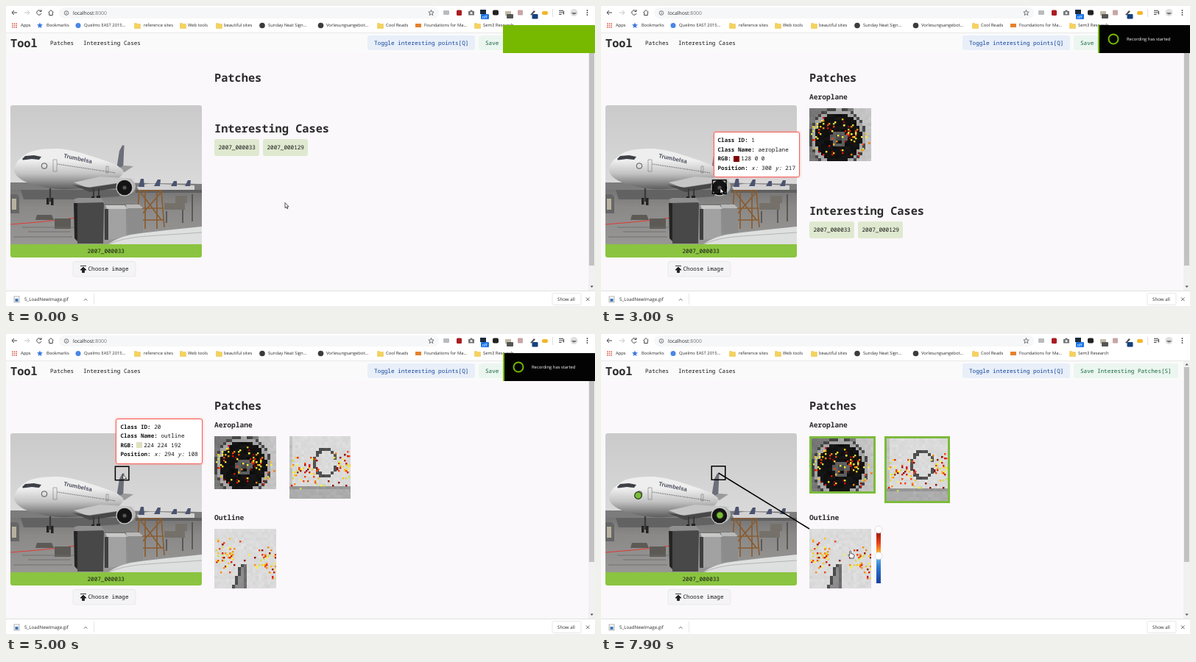
These frames come from a looping animation (800x408 px, 8 s). An HTML page with a canvas:

```html
<!DOCTYPE html>
<html lang="en">
<head>
<meta charset="utf-8">
<title>Patch tool</title>
<style>
html, body { margin: 0; width: 100%; height: 100%; overflow: hidden; background: #fff; }
#stage { position: relative; width: 800px; height: 408px; overflow: hidden; text-rendering: geometricPrecision; }
#stage > * { position: absolute; }
svg { left: 0; top: 0; }
.ui { font: 5.85px "Open Sans", sans-serif; fill: #2a2a2a; }
.mono, #tip { font: 7.65px "Noto Sans Mono", "DejaVu Sans Mono", monospace; fill: #161616; }
.h1 { font-size: 15.3px; font-weight: 600; fill: #2b2b2b; }
.h2 { font-size: 9.6px; font-weight: 600; fill: #2b2b2b; }
canvas { border: 0 solid #7cbb3c; }
canvas.sel { border-width: 3px; }
#tip {
  box-sizing: border-box; padding: 5px; border: 1px solid #f4625c; border-radius: 3px;
  background: #fff; box-shadow: 0 0 3px #f99; color: #161616; line-height: 12.5px; white-space: pre;
}
#tip b { font-weight: 600; }
#tip s { display: inline-block; width: 8px; height: 8px; margin: 0 2.5px 0 3px; vertical-align: -1.5px; }
#note { left: 675px; top: 26px; width: 125px; height: 38px; overflow: hidden; background: #76b900; animation: leave 8s linear infinite; }
#note div { position: absolute; left: 2px; width: 123px; height: 38px; background: #030303; animation: cover 8s linear infinite; }
@keyframes leave { 0%, 74% { transform: none; } 77.5%, 100% { transform: translateX(126px); } }
@keyframes cover {
  0%, 1.4% { transform: translateX(100%); animation-timing-function: ease-out; }
  6%, 71.2% { transform: none; animation-timing-function: ease-in; }
  74%, 100% { transform: translateX(100%); }
}
</style>
</head>
<body>
<div id="stage">
<svg width="800" height="408">
  <defs>
    <linearGradient id="sky" x2="0" y2="1"><stop stop-color="#cbcaca"/><stop offset="1" stop-color="#dadada"/></linearGradient>
    <linearGradient id="ground" x2="0" y2="1"><stop stop-color="#737272"/><stop offset=".35" stop-color="#8a8988"/><stop offset="1" stop-color="#989796"/></linearGradient>
    <linearGradient id="hull" x2="0" y2="1"><stop offset=".3" stop-color="#eeeeee"/><stop offset=".62" stop-color="#c2c2c2"/><stop offset=".85" stop-color="#858585"/><stop offset="1" stop-color="#5c5c5c"/></linearGradient>
    <linearGradient id="hot" x2="0" y2="1"><stop stop-color="#8a0a05"/><stop offset=".5" stop-color="#e8401a"/><stop offset="1" stop-color="#ffd83a"/></linearGradient>
    <linearGradient id="cold" x2="0" y2="1"><stop stop-color="#6fc4ea"/><stop offset=".4" stop-color="#2f78d0"/><stop offset="1" stop-color="#173f9c"/></linearGradient>
    <clipPath id="frame"><path d="M6 324V138q0-3 3-3H263q3 0 3 3V324Z"/></clipPath>
    <clipPath id="page"><path d="M0 64H791V387H0Z"/></clipPath>
    <path id="folder" d="M-4-3h3l1 1h4v6h-8Z" fill="#f6d25c" stroke="#e0b43c" stroke-width=".4"/>
  </defs>

  <rect width="800" height="408" fill="#fff"/>
  <!-- address bar -->
  <rect x="72" y="2" width="516" height="15" rx="7.5" fill="#f6f7f8"/>
  <g fill="none" stroke="#444" stroke-width="1">
    <path d="M15 9H8M11 6L8 9l3 3"/>
    <path d="M25 9h7M29 6l3 3-3 3" stroke="#c4c4c4"/>
    <path d="M47.500 7A3.200 3.200 0 1 0 48 10M48 5v2.500h-2.500"/>
    <path d="M57.500 9l3.500-3.500 3.500 3.500M58.700 8.500v4h4.600v-4"/>
    <circle cx="82" cy="9.500" r="2.800" stroke-width=".7"/><path d="M82 9v2M82 7.600v.7" stroke-width=".7"/>
    <path d="M577.500 5.500l1 2.500 2.600.2-2 1.700.7 2.600-2.300-1.400-2.300 1.400.7-2.600-2-1.700 2.600-.2Z" stroke-width=".7"/>
    <path d="M742.500 4v11" stroke="#ccc" stroke-width=".6"/>
    <path d="M751 6.500h6M751 9h6M751 11.500h3.500M757.500 7v4.500" stroke-width="1.100"/>
  </g>
  <text class="ui" x="91" y="11.800" style="font-size:6.800px">localhost<tspan fill="#777">:8000</tspan></text>
  <rect x="594" y="6" width="8" height="6" rx="1" fill="#b9bcbf"/>
  <rect x="612" y="5.500" width="7" height="7.500" rx="1.500" fill="#a91c20"/>
  <path d="M628 7h2l1-1.500h2l1 1.500h2v5.500h-8Z" fill="#777"/><circle cx="632" cy="9.600" r="1.500" fill="#eee"/>
  <rect x="644" y="5" width="8" height="6" fill="#1c2b3c"/><rect x="645" y="11" width="11" height="7" rx="1" fill="#1a73e8"/>
  <text class="ui" x="646.500" y="16.500" style="fill:#fff;font-size:5.500px">off</text>
  <rect x="661" y="5.500" width="8" height="7" rx="2" fill="#222"/>
  <rect x="678" y="7" width="8" height="6" fill="#c1bba5"/><rect x="680" y="11" width="9" height="6" rx="1" fill="#555"/>
  <rect x="695" y="5.500" width="7" height="7" rx="1" fill="#c9a5a5"/>
  <path d="M712 12l5-6 2 1.500-5 5Z" fill="#555"/><rect x="714.500" y="11" width="8" height="6.500" rx="1" fill="#17407e"/>
  <rect x="728" y="7" width="8" height="5" rx="2" fill="#f3b62c"/>
  <circle cx="771.500" cy="9" r="5" fill="#dedfe1"/><path d="M768 9q3.500 5 7 0Z" fill="#777"/>
  <g fill="#444"><circle cx="789.500" cy="6" r=".9"/><circle cx="789.500" cy="9" r=".9"/><circle cx="789.500" cy="12" r=".9"/></g>

  <!-- bookmarks -->
  <path d="M8 24h7M8 26.500h7M8 29h7" stroke="#d9604f" stroke-width="1.600" stroke-dasharray="1.600 1.100"/>
  <path d="M46 22.500l1.100 2.600 2.900.2-2.200 1.800.7 2.800-2.500-1.500-2.500 1.500.7-2.800-2.200-1.800 2.900-.2Z" fill="#3b78e0"/>
  <circle cx="98" cy="26.500" r="3.500" fill="#4a86e8"/>
  <circle cx="348" cy="26.500" r="3.800" fill="#3c3c3c"/>
  <circle cx="427.500" cy="26.500" r="3.800" fill="#3c3c3c"/>
  <rect x="556" y="24" width="8" height="5" fill="#e5812e"/>
  <use href="#folder" x="178.500" y="26.500"/><use href="#folder" x="240.500" y="26.500"/><use href="#folder" x="289.500" y="26.500"/>
  <use href="#folder" x="508.500" y="26.500"/><use href="#folder" x="640.500" y="26.500"/>
  <g class="ui">
    <text x="20" y="28.400">Apps</text><text x="55" y="28.400">Bookmarks</text>
    <text x="106" y="28.400">Quelmo EAST 2015...</text><text x="187" y="28.400">reference sites</text>
    <text x="247" y="28.400">Web tools</text><text x="296" y="28.400">beautiful sites</text>
    <text x="356" y="28.400">Sunday Neat Sign...</text><text x="435" y="28.400">Vorlesungsangebot...</text>
    <text x="516" y="28.400">Cool Reads</text><text x="568" y="28.400">Foundations for Ma...</text>
    <text x="648" y="28.400">Sem3 Research</text>
  </g>

  <!-- page -->
  <rect y="36" width="800" height="351" fill="#faf8fa"/>
  <rect y="36" width="792" height="28" fill="#fbfafb"/>
  <path d="M0 36.500H800" stroke="#e4e4e4" stroke-width=".8"/>
  <rect x="491" y="40" width="146" height="20" rx="3" fill="#e8eff9"/>
  <rect x="642" y="40" width="142" height="20" rx="3" fill="#ecf6f0"/>
  <g class="mono">
    <text x="6" y="55.500" class="h1">Tool</text>
    <text x="60" y="52.500">Patches</text><text x="105" y="52.500">Interesting Cases</text>
    <text x="500" y="52.500" style="fill:#124297">Toggle interesting points[Q]</text>
    <text x="651" y="52.500" style="fill:#12683a">Save Interesting Patches[S]</text>
    <text x="283" y="103.300" class="h1">Patches</text>
    <text id="aero" x="283" y="126.800" class="h2">Aeroplane</text>
    <text id="outl" x="283" y="252.500" class="h2">Outline</text>
    <g clip-path="url(#page)"><g id="cases">
      <text x="283" y="172" class="h1">Interesting Cases</text>
      <rect x="283" y="181" width="61" height="23" rx="3" fill="#dfe9d0"/><text x="288.500" y="195">2007_000033</text>
      <rect x="349" y="181" width="61" height="23" rx="3" fill="#dfe9d0"/><text x="354.500" y="195">2007_000129</text>
    </g></g>
    <path d="M6 324H266V339q0 3-3 3H9q-3 0-3-3Z" fill="#8ac440"/>
    <text x="110.500" y="336">2007_000033</text>
    <rect x="91" y="347.500" width="85" height="20.500" rx="3" fill="#f4f4f6" stroke="#e3e4e7" stroke-width=".7"/>
    <text x="111.500" y="360.300">Choose image</text>
  </g>
  <path d="M101 353.500h8M105 355l4 4h-2.500v3.500h-3V359H101Z" fill="#222" stroke="#222" stroke-width=".9"/>
  <rect x="791" y="37" width="9" height="350" fill="#f1f1f1"/>
  <rect id="thumb" x="792" y="45" width="7" height="308" fill="#c1c1c1"/>
  <path d="M793.500 42.500l2.200-2.500 2.200 2.500ZM793.500 380.500l2.200 2.500 2.200-2.500Z" fill="#555"/>

  <!-- photo -->
  <g clip-path="url(#frame)">
    <rect x="6" y="135" width="260" height="112" fill="url(#sky)"/>
    <rect x="6" y="246" width="260" height="78" fill="url(#ground)"/>
    <path d="M6 240h120l140 2v8H6Z" fill="#7b7c7b"/>
    <path d="M178 246q12-6 30-4l48 2v6h-76Z" fill="#d2d2d2"/>
    <path d="M180 246l3-11h4l1 11ZM201 245l5-9h4l-1 9ZM224 245l4-7h4v7ZM243 245l4-8h4l-1 8Z" fill="#4c5370"/>
    <path d="M176 250h90v4h-90Z" fill="#5f5f5f"/>
    <path d="M6 256h9l3 4v22H6Z" fill="#666"/><path d="M8 262h6v15H8Z" fill="#b8b0a0"/>
    <path d="M20 250h134v9l-60 4H24Z" fill="#626262"/>
    <path d="M150 222L154 197 158 189.500 160.500 189.500 159 224Z" fill="#6c6e78"/>
    <path d="M148 222l13-5 12 1-12 8Z" fill="#9a9a9a"/>
    <path d="M11 223C11 215 17 209 25 203C32 197 46 194 66 194C88 194 112 202 150 216L159 223C160 230 152 237 140 240C118 247 92 250 72 249C46 247 12 239 11 223Z" fill="url(#hull)"/>
    <path d="M22 208l4-4 12-1 10 2-3 4-10-1-12 1.500Z" fill="#3d4046"/>
    <path d="M70 215L149 227" stroke="#666" stroke-width="1.200" stroke-dasharray="1.200 1.300"/>
    <path d="M64 209v16h5v-16ZM136 218v9h3v-9Z" fill="none" stroke="#777" stroke-width=".6"/>
    <circle cx="52" cy="217.500" r="3.800" fill="none" stroke="#444" stroke-width=".9"/>
    <text transform="translate(78 206)rotate(12)" font-family="Liberation Sans, sans-serif" font-weight="700" font-size="7.800" fill="#4a4d5c">Trumbelsa</text>
    <path d="M92 240L128 232 176 235 150 241 110 247Z" fill="#c6c6c6"/>
    <path d="M90 243l24 4 40-6v6l-40 6Z" fill="#484848"/>
    <path d="M60 248v18M119 248v16M126 248v14" stroke="#3a3a3a" stroke-width="2.200"/>
    <path d="M55 261h3.500v9H55ZM61 261h3.500v10H61ZM116 259h4v9h-4ZM123 258h5v8h-5Z" fill="#222"/>
    <path d="M161 234q14 1 15 11 0 10-14 13Z" fill="#b5b5b5"/>
    <ellipse cx="161" cy="246.500" rx="11.500" ry="12" fill="#c9c9c9"/>
    <circle cx="161" cy="247" r="10.300" fill="#141414"/><circle cx="161" cy="247" r="2.600" fill="#555"/>
    <path d="M6 297Q50 294 95 288" fill="none" stroke="#e23b31" stroke-width="1.200"/>
    <path d="M42 284h20l3 7H40ZM66 289h22v14H66Z" fill="#5d5a55"/>
    <path d="M22 301h70M30 307h58M10 314h80M130 270h45" stroke="#6c6c6c" stroke-width=".9"/>
    <path d="M177 304L181 251h30l4 50M181 251l30 40M211 253l-33 38M178 275h36M177 291h38M189 251v52M205 251v52" fill="none" stroke="#8a5c30" stroke-width="1.700"/>
    <path d="M215 268h28v9h-28ZM230 258h16v10h-16Z" fill="#75716a"/>
    <path d="M218 279v16M240 277v18M253 256v37" stroke="#444" stroke-width="1.400"/>
    <path d="M97 264l32-1 4 6-1 54H97Z" fill="#484848"/>
    <path d="M92 263l5-2h32l5 6-39 1Z" fill="#8f8f8f"/><path d="M92 268h5v52l-4-4Z" fill="#242424"/>
    <path d="M139 274h22l2 4v37l-24 3Z" fill="#a2a2a2"/><path d="M135 271h26l4 5h-28Z" fill="#c8c8c8"/>
    <path d="M134 276h5v42h-5Z" fill="#3f3f3f"/>
    <path d="M165 273h18l3 5v32h-21Z" fill="#8c8c8c"/><path d="M163 270h18l5 5h-22Z" fill="#b9b9b9"/>
    <path d="M139 324q16-12 44-15 40-5 83-9v24Z" fill="#dedfdf"/>
    <path d="M139 324q20-9 52-11l75-5" fill="none" stroke="#aaa" stroke-width=".8"/>
  </g>

  <!-- download bar -->
  <path d="M0 387.500H800" stroke="#e0e0e0"/>
  <rect x="11" y="395" width="7" height="8" fill="#f7f7f7" stroke="#888" stroke-width=".6"/><rect x="12.500" y="398" width="4" height="4" fill="#3f78b8"/>
  <path d="M106 400.500l2.200-2.300 2.200 2.300M788 396.500l4.500 4.500M792.500 396.500L788 401" fill="none" stroke="#555" stroke-width=".9"/>
  <path d="M119.500 391v15" stroke="#ddd" stroke-width=".7"/>
  <rect x="742" y="390.500" width="39" height="16" rx="2" fill="#fff" stroke="#ddd" stroke-width=".7"/>
  <g class="ui" style="font-size:6.200px"><text x="25" y="401">5_LoadNewImage.gif</text><text x="749" y="401">Show all</text></g>
</svg>

<div id="tip"></div>

<svg id="over" width="800" height="408">
  <g fill="#79bd36" stroke="#26331a" stroke-width="1.200"><circle class="dot" r="4.800"/><circle class="dot" r="4.800"/></g>
  <g id="link" fill="none" stroke-width="1.500"><rect width="18.500" height="18.500"/><path/></g>
  <circle id="core" r="3.300" fill="#79bd36"/>
  <g id="slider">
    <rect x="-3" width="6" fill="url(#hot)"/><rect x="-3" width="6" fill="url(#cold)"/>
    <circle r="5" fill="#fff" stroke="#ccc" stroke-width=".6"/><circle r="5" fill="#fff" stroke="#ccc" stroke-width=".6"/>
  </g>
  <g id="cursor" fill="#fff" stroke="#111" stroke-width=".7">
    <path d="M0 0V7.200L1.700 5.700 2.800 8.200 3.900 7.700 2.800 5.300H5Z"/>
    <path d="M-.8 1q.9-1.500 1.700 0v3l3.800 1.200q1 .5.600 2.600l-.7 2.700H.2L-2.800 6.500q.2-1.300 2 .2Z"/>
  </g>
</svg>

<div id="note"><div>
  <svg width="123" height="38">
    <circle cx="19" cy="19" r="6.500" fill="none" stroke="#76b900" stroke-width="2"/>
    <text class="ui" x="37" y="21.400" style="fill:#fff">Recording has started</text>
  </svg>
</div></div>
</div>

<script>
const $ = s => document.querySelector(s), $$ = s => [...document.querySelectorAll(s)];
const LOOP = 8000;
const show = (el, on) => { el.style.display = on ? '' : 'none'; };

let seed = 7;
const rnd = () => (seed = seed * 16807 % 2147483647) / 2147483647;
const tri = () => rnd() + rnd() - 1;

// shade: grey level at a pixel; clusters: [count, cx, cy, spreadX, spreadY]
const patches = [
  { x: 283, y: 139, w: 84, h: 72, at: [161.5, 246.5], born: 2890, pick: 6150,
    shade: (x, y) => {
      const d = Math.hypot((x - 39) / 34, (y - 40) / 36), r = Math.hypot(x - 40, y - 41);
      if (d > 1.14) return x > 60 ? 195 : 120;
      if (d > 1.06) return 70;
      if (d > .93) return 165;
      return r > 6 && r < 11 ? 95 : r < 4 ? 75 : 18;
    },
    clusters: [[58, 42, 31, 41, 20], [26, 42, 48, 38, 22]] },
  { x: 385, y: 139, w: 83, h: 85, at: [50.5, 219.5], born: 3990, pick: 6850,
    shade: (x, y) => {
      const e = Math.hypot((x - 49) / 15, (y - 36) / 18);
      if (Math.abs(e - 1) < .12) return 80;
      return y > 73 ? 172 : y > 69 ? 150 : x < 4 ? 195 : 218;
    },
    clusters: [[44, 20, 46, 19, 26], [32, 72, 36, 12, 24], [16, 45, 58, 36, 14]] },
  { x: 283, y: 265, w: 84, h: 81, at: [159.5, 189], born: 4890, pick: Infinity,
    shade: (x, y) => {
      const left = 36 - (y - 47) * .35;
      if (y > 47 && x > left && x < 45) return x < left + 4 ? 75 : x > 40 ? 110 : 140;
      return 219;
    },
    clusters: [[42, 14, 34, 13, 26], [38, 68, 46, 15, 24], [14, 42, 26, 36, 24]] }
];
const heat = ['#ffee3a', '#ffc21a', '#ff8a0a', '#f5410c', '#dc1408', '#8e0a06', '#cfe04a'];

for (const p of patches) {
  const c = p.el = document.createElement('canvas'), g = c.getContext('2d');
  c.width = p.w; c.height = p.h;
  c.style.left = p.x + 'px'; c.style.top = p.y + 'px';
  for (let y = 0; y < p.h; y += 4) for (let x = 0; x < p.w; x += 4) {
    const v = p.shade(x + 2, y + 2) + tri() * 7;
    g.fillStyle = `rgb(${v},${v},${v})`;
    g.fillRect(x, y, 4, 4);
  }
  for (const [n, cx, cy, sx, sy] of p.clusters) for (let i = 0; i < n; i++) {
    g.fillStyle = heat[rnd() * heat.length | 0];
    const x = cx + (rnd() * 2 - 1) * sx, y = cy + tri() * sy;
    g.fillRect(2 * Math.round(x / 2), 2 * Math.round(y / 2), 2.4, 2.4);
  }
  $('#stage').insertBefore(c, $('#tip'));
}

// pointer path: [ms, x, y]
const path = [
  [0, 379, 267.5], [500, 379, 267.5], [800, 300, 268], [1000, 240, 262], [1200, 190, 248], [1300, 173.5, 241.5],
  [1400, 164.6, 238], [1600, 158, 239], [1800, 160, 246], [1950, 162, 247.8], [3150, 162, 247.8],
  [3400, 142, 242], [3600, 92.5, 227.5], [3700, 51.8, 221.3], [4150, 51.8, 221.3], [4400, 95, 208],
  [4600, 148, 196], [4750, 158.9, 191.2], [5700, 158.9, 191.2], [6000, 300, 182], [6100, 321, 184.5],
  [6320, 321, 184.5], [6500, 415, 178], [6650, 432, 180], [7050, 432, 180], [7400, 345, 285],
  [7600, 341, 292], [7800, 338.5, 294.5], [8000, 338.5, 294.5]
];
function pointer(t) {
  const i = Math.max(1, path.findIndex(k => k[0] >= t));
  const [a, b] = [path[i - 1], path[i]], f = Math.max(0, (t - a[0]) / (b[0] - a[0]));
  return [a[1] + (b[1] - a[1]) * f, a[2] + (b[2] - a[2]) * f];
}

const classes = {
  background: [0, '0 0 0'], aeroplane: [1, '128 0 0'], outline: [20, '224 224 192']
};
function classAt(x, y) {
  if (Math.hypot(x - 159, y - 191) < 5) return 'outline';
  return x > 176 || y < 194 + Math.max(0, x - 85) * .33 ? 'background' : 'aeroplane';
}

const tip = $('#tip'), [box, wire] = $('#link').children, [arrow, hand] = $('#cursor').children;
const [hotBar, coldBar, , knob] = $('#slider').children;
const move = (el, x, y) => el.setAttribute('transform', `translate(${x} ${y})`);

function drawTip(t, x, y) {
  const name = classAt(x, y), [id, rgb] = classes[name], [lx, ly] = pointer(t - 100);
  tip.style.left = lx - 9.5 + 'px';
  tip.style.top = ly - 76.5 + 'px';
  tip.innerHTML = `<b>Class ID:</b> ${id}\n<b>Class Name:</b> ${name}\n` +
    `<b>RGB:</b><s style="background:rgb(${rgb.split(' ')})"></s>${rgb}\n` +
    `<b>Position:</b> <i>x:</i> ${Math.round((x - 6) / .52)} <i>y:</i> ${Math.round((y - 135) / .52)}`;
}

function drawLink(p, picked) {
  const [x, y] = p.at;
  $('#link').setAttribute('stroke', picked ? '#79bd36' : '#000');
  move(box, x - 9.25, y - 9.25);
  wire.setAttribute('d', `M${x} ${y}L${p.x} ${p.y}`);
  move($('#core'), x, y);
  const h = p.h - 8, mid = h * .49;
  move($('#slider'), p.x + 94, p.y + 1);
  hotBar.setAttribute('height', mid);
  coldBar.setAttribute('y', mid);
  coldBar.setAttribute('height', h - mid);
  move(knob, 0, mid);
}

function draw(t) {
  const [x, y] = pointer(t);
  const inImage = x > 6 && x < 266 && y > 135 && y < 324;
  const over = patches.find(p => t >= p.born && x > p.x && x < p.x + p.w && y > p.y && y < p.y + p.h);
  const picked = over && t >= over.pick;
  const [first, , third] = patches.map(p => t >= p.born);

  for (const p of patches) {
    show(p.el, t >= p.born);
    p.el.className = t >= p.pick ? 'sel' : '';
  }
  $$('.dot').forEach((d, i) => {
    const p = patches[i];
    move(d, ...p.at);
    show(d, t >= p.pick && p !== over);
  });
  show($('#aero'), first);
  show($('#outl'), third);
  move($('#cases'), 0, third ? 238 : first ? 112 : 0);
  $('#thumb').setAttribute('height', third ? 265 : 308);

  show(tip, inImage);
  if (inImage) drawTip(t, x, y);
  show($('#link'), inImage || over);
  show(wire, over);
  show($('#slider'), over);
  show($('#core'), picked);
  if (over) drawLink(over, picked);
  else if (inImage) {
    $('#link').setAttribute('stroke', '#000');
    move(box, x - 10.5, y - 11);
  }

  move($('#cursor'), x, y);
  show(arrow, !over);
  show(hand, over);
}

let start;
function tick(now) {
  start ??= now;
  draw((now - start) % LOOP);
  requestAnimationFrame(tick);
}
draw(0);
requestAnimationFrame(tick);
</script>
</body>
</html>
```
